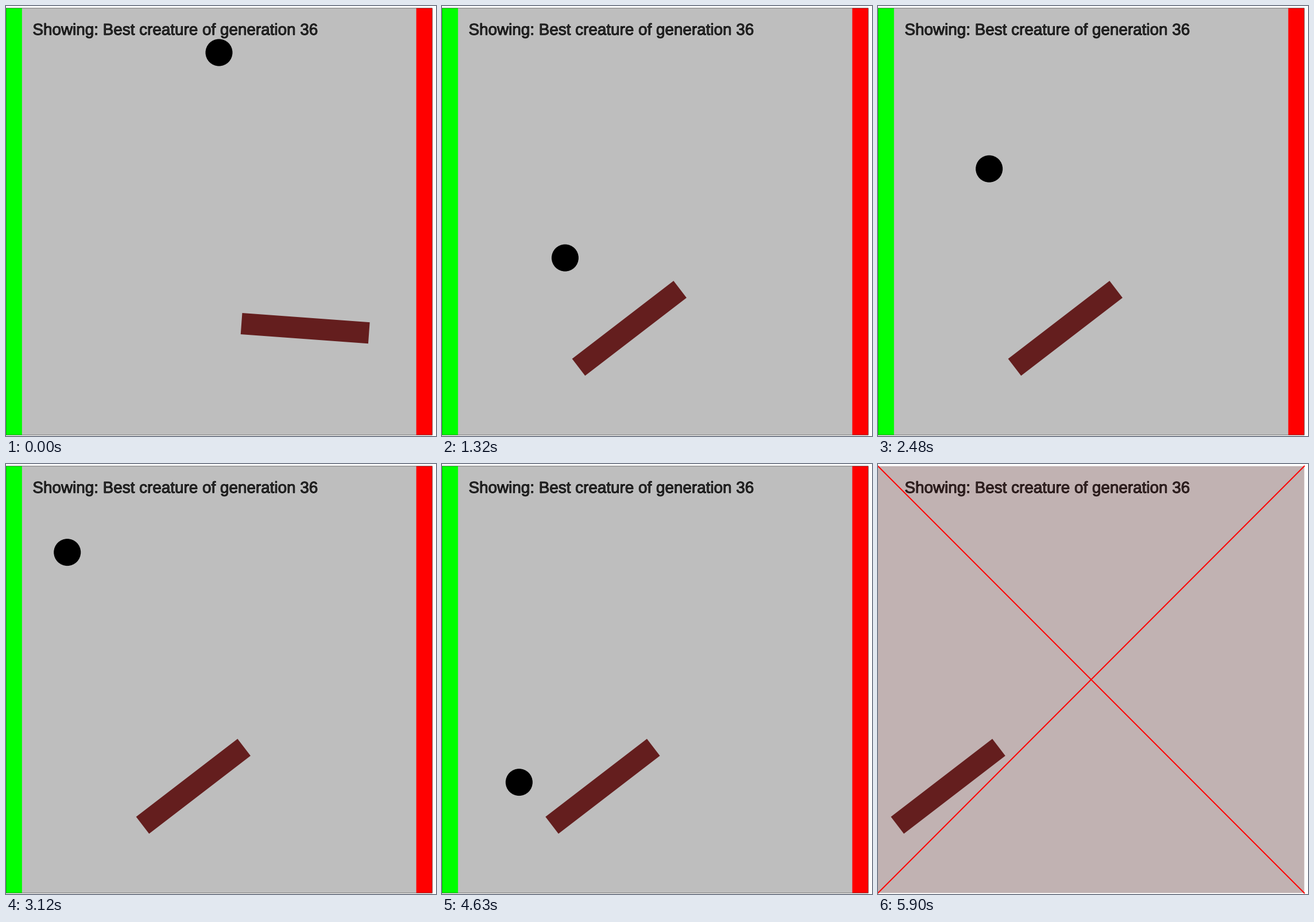
A matplotlib script that plays this animation: 749x748 px, repeating every 6000 ms.

```python
import numpy as np
import matplotlib.pyplot as plt
from matplotlib.animation import FuncAnimation
from matplotlib.patches import Circle, PathPatch, Polygon, Rectangle
from matplotlib.textpath import TextPath
from matplotlib.transforms import Affine2D

W, H, DPI = 749, 748, 100
LOOP, TICK = 6000, 20
PX = 72 / DPI              # one pixel in points
SIZE, TOP = 742.5, 3.75    # arena
U = SIZE / 80              # world unit
TURN = 37.5 / 9            # paddle rotation per step, degrees
FALL = .427                # half the gravity, px per step squared
WALL = 51.2                # ball centre when it touches the left wall
LAST = 148

# Key points of the uneven clock: time in ms, simulation step
CLOCK = [(0, 0), (620, 14), (2100, 55), (LOOP, 150)]

# Start, paddle hits and end: step, x, y (x before folding at the wall)
HITS = [(0, 371, 81), (26.6, 371, 472), (52, 269, 551),
        (114.4, 195, 582), (131, 295, 500), (LAST, 372, 218)]
OFF_WALL = (1, 2, 3)       # flights that bounce off the left wall


def step_at(t):
    return int(np.interp(t, *zip(*CLOCK)) + .5)


def ball_at(n):
    leg = max(i for i, hit in enumerate(HITS[:-1]) if hit[0] <= n)
    (n0, x0, y0), (n1, x1, y1) = HITS[leg:leg + 2]
    if leg in OFF_WALL:
        x1 = 2 * WALL - x1
    f = (n - n0) / (n1 - n0)
    x = x0 + f * (x1 - x0)
    y = y0 + f * (y1 - y0) + FALL * (n - n0) * (n - n1)
    return WALL + abs(x - WALL), y


def paddle_at(n):
    """Corners after the three runs to the left and the tilt back."""
    moved = min(n, 21) + np.clip(n - 86, 0, 5) + max(n - 131, 0)
    a = np.radians(TURN * max(-9, min(1 + n, 5, 17 - n)))
    c, s = np.cos(a), np.sin(a)
    box = np.array([(-12, -2), (12, -2), (12, 2), (-12, 2)]) * U
    return box @ np.array([(c, s), (-s, c)]) + (521.2 - U * moved, TOP + 60 * U)


plt.rcParams["font.family"] = "Liberation Sans"
fig = plt.figure(figsize=(W / DPI, H / DPI), dpi=DPI, facecolor="white")
ax = fig.add_axes([0, 0, 1, 1])
ax.set(xlim=(0, W), ylim=(H, 0))
ax.axis("off")


def rect(x, w, color, **kw):
    style = dict(fc=color, lw=0, snap=False) | kw
    return ax.add_patch(Rectangle((x, TOP), w, SIZE, **style))


rect(0, SIZE, "#bebebe", zorder=0)
frame = [rect(0, 3 * U, "#00ff00", zorder=1),
         rect(77 * U, 3 * U, "#ff0000", zorder=1),
         rect(0, SIZE, "none", ec="black", alpha=.6, lw=.8 * PX, zorder=2)]

title = TextPath((0, 0), "Showing: Best creature of generation 36", size=3 * U)
flip = Affine2D().scale(1, -1).translate(5 * U, TOP + 5 * U)
ax.add_patch(PathPatch(title, fc="#323232", ec="black", lw=.9 * PX, zorder=3,
                       transform=flip + ax.transData))

ball = ax.add_patch(Circle((0, 0), 23.5, fc="black", lw=0, zorder=4))
paddle = ax.add_patch(Polygon(paddle_at(0), fc="#641e1e", lw=0, zorder=6))

over = [rect(0, SIZE, "red", alpha=.06, zorder=5)]
for ys in ((TOP, TOP + SIZE), (TOP + SIZE, TOP)):
    over += ax.plot((0, SIZE), ys, color="red", lw=2 * PX, zorder=7)


def draw(i):
    n = step_at((i + .5) * TICK)
    done = n >= LAST
    ball.center = ball_at(n)
    paddle.set_xy(paddle_at(min(n, LAST)))
    for art in frame + [ball]:
        art.set_visible(not done)
    for art in over:
        art.set_visible(done)
    return [ball, paddle, *frame, *over]


anim = FuncAnimation(fig, draw, frames=LOOP // TICK, interval=TICK,
                     repeat=True, repeat_delay=0, blit=False)
plt.show()
```
